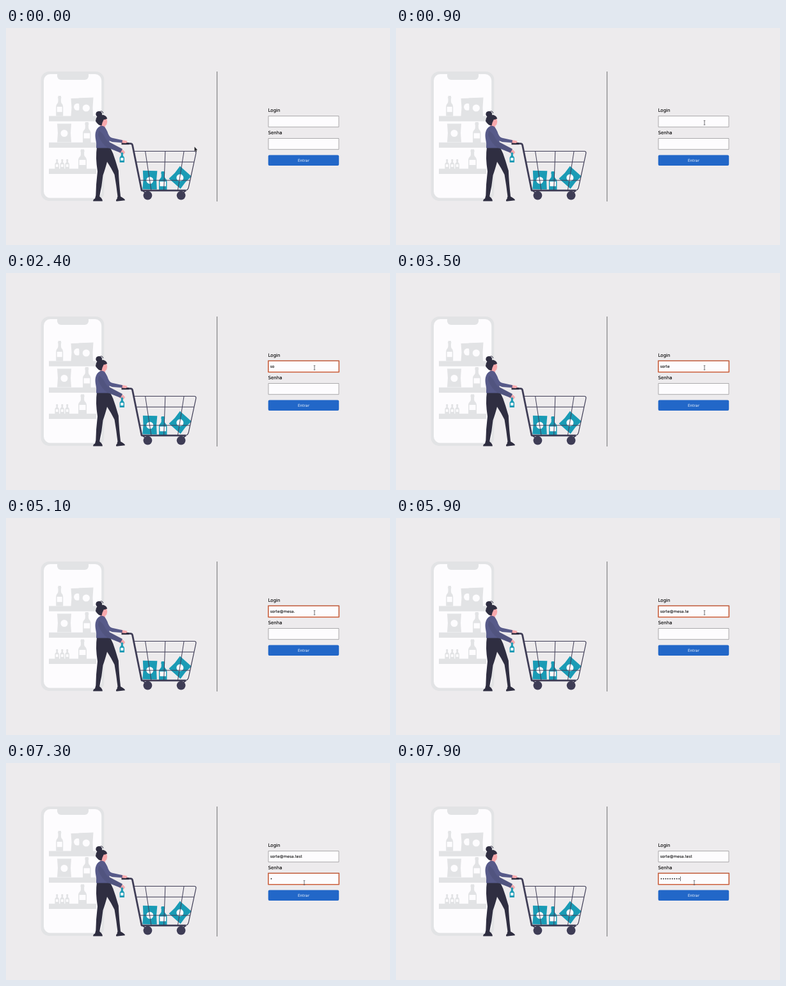
These frames come from a looping animation (600x339 px, 8 s). An HTML page with a canvas:

```html
<!DOCTYPE html>
<html lang="pt">
<head>
<meta charset="utf-8">
<title>Login</title>
<style>
html, body { margin: 0; width: 100%; height: 100%; overflow: hidden; background: #edebed; }
canvas, svg { position: absolute; left: 0; top: 0; width: 600px; height: 339px; }
text { font: 5.9px "DejaVu Sans", sans-serif; fill: #111; stroke: #111; stroke-width: 0.1; white-space: pre; }
.label { font-size: 7px; fill: #000; stroke: #000; }
.button { fill: #eef3fb; stroke: none; text-anchor: middle; }
</style>
</head>
<body>
<canvas id="stage"></canvas>
<svg viewBox="0 0 600 339">
  <text class="label" x="409.6" y="131">Login</text>
  <text class="label" x="409.6" y="165.9">Senha</text>
  <text id="login" x="412.7" y="147.9"></text>
  <text id="pass" x="412.7" y="183"></text>
  <text class="button" x="465" y="209">Entrar</text>
</svg>
<script>
const LOOP = 8000, STEP = 100;
const NAVY = '#2f2e41', STEEL = '#3f3d56', SWEATER = '#575a89';
const TEAL = '#1a9bb5', GREY = '#e2e3e5', PAPER = '#fdfcfe', SKIN = '#f9a9ac';

const EMAIL = 'sorte@mesa.test';
const KEY_TIMES = [2000, 2200, 2600, 2900, 3200, 3600, 3800, 4000, 4200, 4300, 4500,
  5600, 5800, 6000, 6200];
const FOCUS_LOGIN = 1300, FOCUS_PASS = 7100;
const POINTER = [[100, 294.5, 185.5], [500, 511.5, 166], [900, 482, 148],
  [6400, 482, 148], [6700, 470.5, 141], [7100, 466, 187]];

const canvas = document.getElementById('stage');
const ctx = canvas.getContext('2d');
const loginText = document.getElementById('login');
const passText = document.getElementById('pass');
const dpr = window.devicePixelRatio || 1;
canvas.width = 600 * dpr;
canvas.height = 339 * dpr;

function fill(path, color) {
  ctx.fillStyle = color;
  ctx.fill(new Path2D(path));
}

function line(path, color, width) {
  ctx.strokeStyle = color;
  ctx.lineWidth = width;
  ctx.stroke(new Path2D(path));
}

function round(x, y, w, h, r, color) {
  ctx.fillStyle = color;
  ctx.beginPath();
  ctx.roundRect(x, y, w, h, r);
  ctx.fill();
}

function dot(x, y, r, color, ry = r) {
  ctx.fillStyle = color;
  ctx.beginPath();
  ctx.ellipse(x, y, r, ry, 0, 0, Math.PI * 2);
  ctx.fill();
}

// A bottle centred on x, with its cap at y.
function bottle(x, y, w, h, color) {
  const n = w * 0.2, side = w / 2;
  fill(`M${x - n} ${y}H${x + n}V${y + h * 0.25}
    C${x + n} ${y + h * 0.4} ${x + side} ${y + h * 0.38} ${x + side} ${y + h * 0.55}
    V${y + h}H${x - side}V${y + h * 0.55}
    C${x - side} ${y + h * 0.38} ${x - n} ${y + h * 0.4} ${x - n} ${y + h * 0.25}Z`, color);
  round(x - n - 0.5, y + h * 0.06, n * 2 + 1, h * 0.06, 0.4, color);
  round(x - side + 1.5, y + h * 0.54, w - 3, h * 0.26, 0.5, PAPER);
}

// A snack bag centred on x, y with a round label.
function bag(x, y, w, h, angle, color) {
  ctx.save();
  ctx.translate(x, y);
  ctx.rotate(angle);
  fill(`M${-w / 2} ${-h / 2}H${w / 2}L${w / 2 - 1} 0L${w / 2} ${h / 2}H${-w / 2}L${1 - w / 2} 0Z`, color);
  dot(0, 0.5, 5.5, PAPER);
  ctx.restore();
}

function drawPhone() {
  round(54.5, 68, 98.8, 202, 13, GREY);
  round(59, 72, 90.2, 193.5, 10, PAPER);
  round(80, 70, 49, 11, [0, 0, 6, 6], GREY);
  for (const y of [137.5, 178.8, 219.8]) round(67, y, 74, 8.3, 0, GREY);
  bottle(83.7, 106, 11, 31.5, GREY);
  fill('M101.5 110L122 109.5V138H101.5L102.5 124Z', GREY);
  dot(111.5, 123.3, 5.5, PAPER);
  fill('M113.5 109.5L136.5 108.5L135.5 124L136 138H113.5L114.5 124Z', GREY);
  dot(125.3, 125, 5.6, PAPER);
  bag(91, 164, 22, 29, 0, GREY);
  bottle(126.3, 147, 12.5, 32, GREY);
  for (const x of [79.7, 87.8, 95.7]) bottle(x, 205, 6.6, 15, GREY);
  bottle(119.5, 189.5, 13, 30.5, GREY);
}

function drawCart() {
  bag(224.8, 237.5, 22.5, 29, 0.02, TEAL);
  bottle(245.2, 224, 12.5, 29, TEAL);
  bag(272.2, 233.5, 24, 26, 0.72, TEAL);
  line('M199.5 192.5H294Q297.5 192.5 296.8 196L285.5 248Q284.8 252 282 253.5', STEEL, 1.2);
  line('M203 209.3H293.5M209 238H287', STEEL, 1);
  line('M217.7 193L226.8 253M248.8 193L246.7 253M278 193L268.5 253', STEEL, 1);
  line('M181 180.6H194.5Q197 180.6 197.6 183L212 253.8H281.5', STEEL, 2.8);
  line('M180.5 180.6H192', NAVY, 3.2);
  line('M213 253.8L221 260M281 253.8L274 260', STEEL, 1.8);
  for (const x of [221.4, 273.6]) dot(x, 261.6, 6.9, STEEL);
}

function drawWoman() {
  // neck and face
  fill('M148 147L156 149L154.5 156L147 156Z', SKIN);
  fill('M149 142L157 140.5L158.2 146.5L157.2 151Q154 154 149.5 151Z', SKIN);
  // hair
  dot(145.2, 134.5, 4.9, NAVY, 4.5);
  line('M146.5 130.5Q151 128.5 151.7 133', NAVY, 0.9);
  fill('M140 145.5Q140.3 136.5 148 135.8Q156.5 135.2 158.2 141.5Q155.5 143 152.6 143.2Q151.5 146 150.5 148L149.5 152.5Q143.5 152 140 145.5Z', NAVY);
  // hands
  fill('M179 174.5L188.5 176.2L190 178.3L187 180L179 179.2Z', SKIN);
  fill('M177 189L183 190.5L186.2 194L183.8 197.4L177 195Z', SKIN);
  // legs and shoes
  fill('M142 186H162.5Q168 196 171 207L175.8 223Q176.5 242 179.2 264.5H174.6Q172.5 246 169.5 229Q164 218 158 209Q154.5 222 151.5 230Q150 246 146 264H140.2Q140.5 244 143 224Q139.5 202 142 186Z', NAVY);
  fill('M140.2 262L146 263Q151.2 267 150.8 270.5H136.2Q135.8 268 139 266.5Z', NAVY);
  fill('M174 263.8L179.5 263.5Q186.2 267 186 269.3L172.5 270.8Q171 268.5 173.5 267Z', NAVY);
  // sweater and arms
  fill('M147.5 153Q154.5 151 157.5 161Q161.5 170 162.5 187.5H141Q141.8 180 139.8 172Q138 158 147.5 153Z', SWEATER);
  fill('M153 155Q157.5 158 159.5 165Q162 171 166 171.8L182 175.2L181.5 179.2L166 178Q155 175 151 165Z', SWEATER);
  fill('M145 160Q152 165 155 172Q158 177 162 178.5L182 189L179 195L159 187Q149 181 144 167Z', '#51547f');
  bottle(181.3, 194.5, 7.3, 15.5, TEAL);
}

function drawField(y, focused) {
  ctx.fillStyle = PAPER;
  ctx.fillRect(410, y, 110, 17.2);
  ctx.lineWidth = 0.9;
  ctx.strokeStyle = '#a3a2a4';
  ctx.strokeRect(410, y, 110, 17.2);
  if (!focused) return;
  ctx.lineWidth = 1.5;
  ctx.strokeStyle = '#d16440';
  ctx.strokeRect(409.8, y - 0.2, 110.6, 17.5);
  ctx.setLineDash([1, 1]);
  line(`M409.5 ${y - 0.5}H520.5`, '#85594b', 0.6);
  ctx.setLineDash([]);
}

function pointerAt(t) {
  if (t <= POINTER[0][0]) return POINTER[0].slice(1);
  for (let i = 1; i < POINTER.length; i++) {
    const [t0, x0, y0] = POINTER[i - 1], [t1, x1, y1] = POINTER[i];
    if (t <= t1) {
      const u = (t - t0) / (t1 - t0), k = u * u * (3 - 2 * u);
      return [x0 + (x1 - x0) * k, y0 + (y1 - y0) * k];
    }
  }
  return POINTER[POINTER.length - 1].slice(1);
}

function drawPointer(t) {
  const [x, y] = pointerAt(t);
  const inField = x > 410 && x < 520 && (y > 137 && y < 155 || y > 172 && y < 190);
  ctx.save();
  ctx.translate(x, y);
  if (inField) {
    line('M0 -3V3M-1.3 -3.3H1.3M-1.3 3.3H1.3', '#555558', 0.8);
  } else {
    fill('M0 0V7L1.5 5.7L2.6 8L3.7 7.5L2.7 5.2L4.6 5Z', '#242428');
  }
  ctx.restore();
}

function render(t) {
  const onPass = t >= FOCUS_PASS, onLogin = t >= FOCUS_LOGIN && !onPass;
  loginText.textContent = EMAIL.slice(0, KEY_TIMES.filter(k => k <= t).length);
  const dots = Math.max(0, Math.min(9, Math.floor((t - 7200) / 70)));
  passText.textContent = '•'.repeat(dots);

  ctx.setTransform(dpr, 0, 0, dpr, 0, 0);
  ctx.fillStyle = '#edebed';
  ctx.fillRect(0, 0, 600, 339);
  ctx.lineJoin = 'round';
  drawPhone();
  drawCart();
  drawWoman();
  line('M329.8 68V271', '#6c6b6e', 1);

  drawField(137.5, onLogin);
  drawField(172.5, onPass);
  round(409.7, 198.5, 110.5, 16.5, 2, '#2267c8');

  const blink = (t + 800) % 1200 < 600;
  if ((onLogin || onPass) && blink) {
    const field = onPass ? passText : loginText;
    const width = field.textContent ? field.getComputedTextLength() : 0;
    const y = onPass ? 181 : 146;
    line(`M${413.2 + width} ${y - 3.6}V${y + 3.4}`, '#2a2a2c', 0.7);
  }
  drawPointer(t);
}

const start = performance.now();
function tick(now) {
  const t = Math.max(0, now - start) % LOOP;
  render(Math.floor(t / STEP) * STEP);
  requestAnimationFrame(tick);
}
render(0);
requestAnimationFrame(tick);
</script>
</body>
</html>
```
